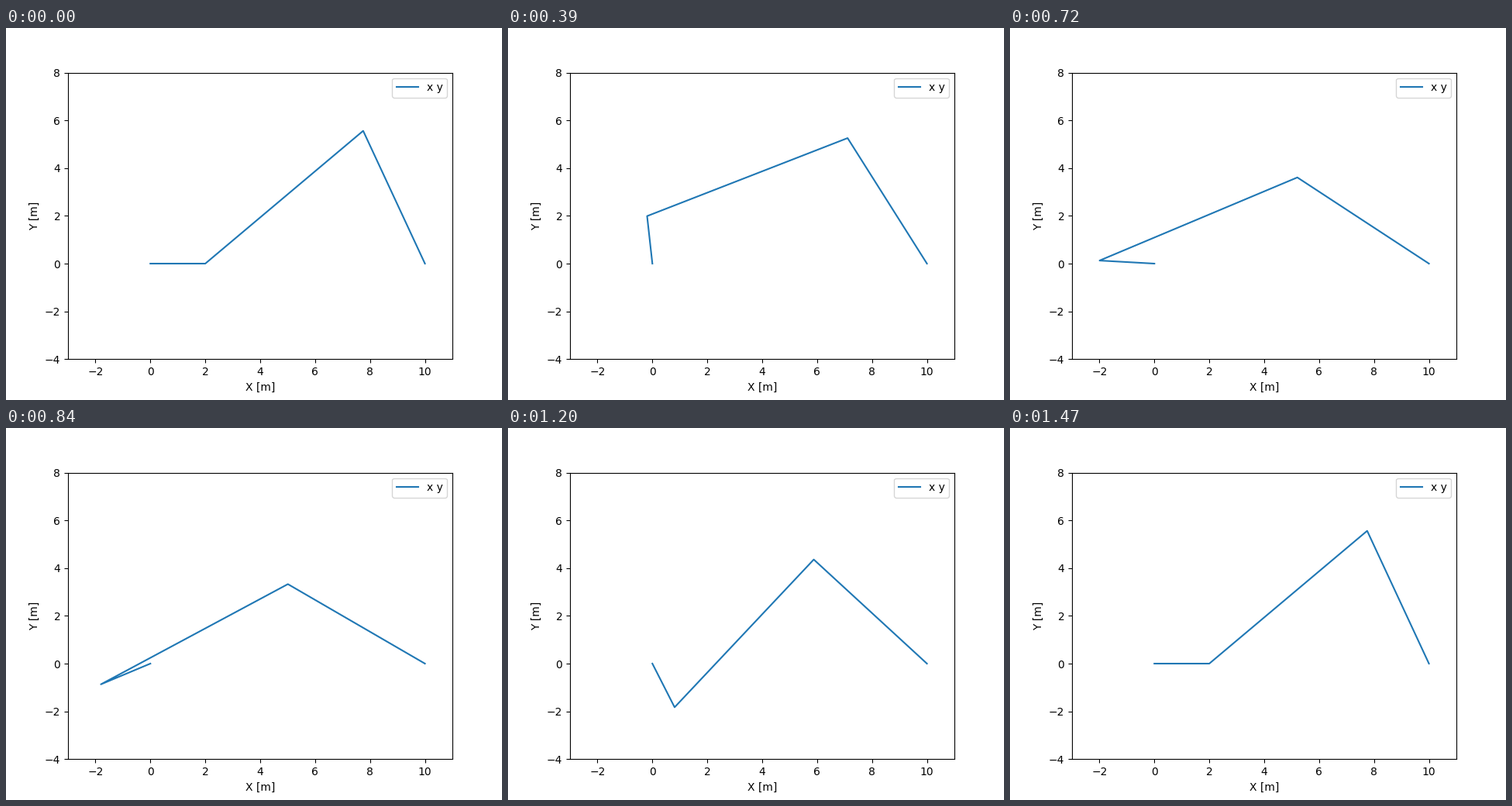
A matplotlib script that plays this animation: 640x480 px, repeating every 1.5 s.

```python
import numpy as np
import matplotlib.pyplot as plt
from matplotlib.animation import FuncAnimation

FRAMES, INTERVAL = 50, 30
CRANK, COUPLER, ROCKER, GROUND = 2, 8, 6, 10
ANGLES = np.linspace(0, 2 * np.pi, FRAMES)

plt.rcParams["font.family"] = "DejaVu Sans"
fig, ax = plt.subplots(figsize=(6.4, 4.8), dpi=100)
ax.set(xlim=(-3, 11), ylim=(-4, 8), xlabel="X [m]", ylabel="Y [m]")
line, = ax.plot([], [], color="C0", label="x y")
ax.legend(loc="upper right")


def linkage(angle):
    """Joints of the four-bar linkage for one crank angle."""
    base, pivot = np.array([0, 0]), np.array([GROUND, 0])
    crank = CRANK * np.array([np.cos(angle), np.sin(angle)])
    span = pivot - crank
    dist = np.hypot(*span)
    along = (COUPLER**2 - ROCKER**2 + dist**2) / (2 * dist)
    height = np.sqrt(COUPLER**2 - along**2)
    unit = span / dist
    normal = np.array([-unit[1], unit[0]])
    joint = crank + along * unit + height * normal
    return np.array([base, crank, joint, pivot])


def update(frame):
    line.set_data(*linkage(ANGLES[frame]).T)
    return line,


anim = FuncAnimation(fig, update, frames=FRAMES, interval=INTERVAL,
                     repeat=True, repeat_delay=0)
plt.show()
```
